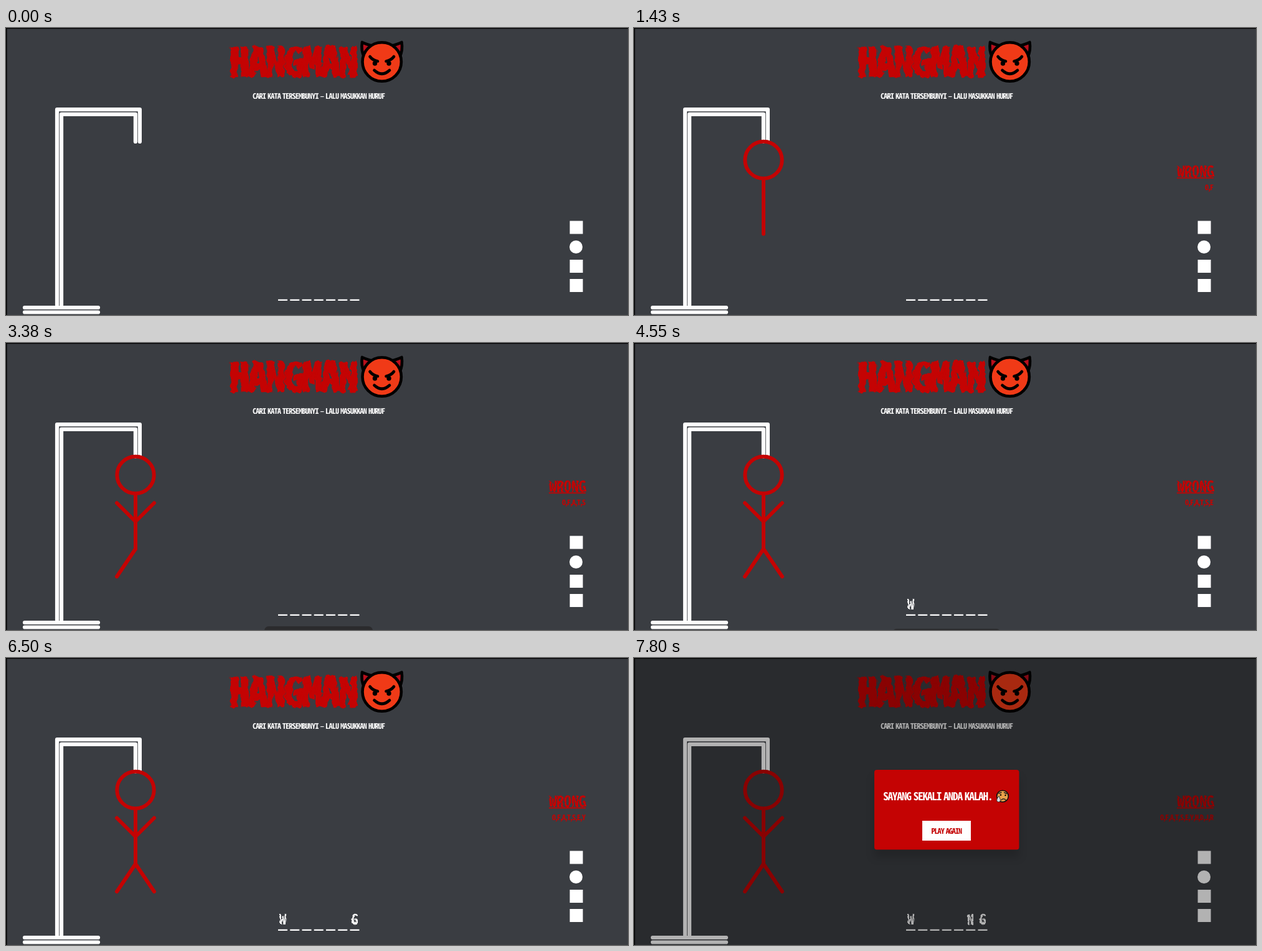
Animation of 999x462 px, one loop 8000 ms. Source, as an HTML page:

```html
<!DOCTYPE html>
<html lang="id">
<head>
<meta charset="utf-8">
<title>Hangman</title>
<style>
  html, body { margin: 0; width: 100%; height: 100%; overflow: hidden; background: #3a3d42; }
  svg { display: block; width: 999px; height: 462px; }
  text {
    font-family: "Noto Sans Mono CJK JP", "Noto Sans Mono CJK SC", "Noto Sans Mono", monospace;
    font-weight: 700;
    font-stretch: extra-condensed;
    text-rendering: geometricPrecision;
    white-space: pre;
  }
  .white { fill: #fff; }
  .red { fill: #c40303; }
  .title { font-size: 64px; letter-spacing: -.044em; stroke: #c40303; stroke-width: 2.4px; }
  .hint { font-size: 12.2px; letter-spacing: -.068em; word-spacing: -.2em; }
  .heading { font-size: 25px; letter-spacing: -.025em; }
  .misses { font-size: 12px; letter-spacing: -2px; text-anchor: end; }
  .guess { font-size: 23px; text-anchor: middle; }
  .message { font-size: 17.5px; letter-spacing: -.075em; word-spacing: -.2em; }
  .button { font-size: 12.2px; letter-spacing: -.085em; word-spacing: -.17em; }
  .line { fill: none; stroke-linecap: round; stroke-linejoin: round; }
  .gallows { stroke: #fff; stroke-width: 6.2px; }
  .figure { stroke: #c40303; stroke-width: 6px; }
  .ink { stroke: #000; stroke-width: 4.6px; }
  .card { filter: drop-shadow(0 12px 7px rgba(0, 0, 0, .16)); }
  [data-at] { visibility: hidden; }
</style>
</head>
<body>
<svg viewBox="0 0 999 462" xmlns="http://www.w3.org/2000/svg">
  <defs>
    <filter id="ragged" color-interpolation-filters="sRGB">
      <feTurbulence type="fractalNoise" baseFrequency=".13 .09" numOctaves="2" seed="8"/>
      <feDisplacementMap in="SourceGraphic" scale="9" xChannelSelector="R" yChannelSelector="G"/>
    </filter>
    <filter id="rough" color-interpolation-filters="sRGB">
      <feTurbulence type="fractalNoise" baseFrequency=".22" numOctaves="2" seed="4"/>
      <feDisplacementMap in="SourceGraphic" scale="4" xChannelSelector="R" yChannelSelector="G"/>
    </filter>
  </defs>
  <rect width="999" height="462" fill="#3a3d42"/>

  <text class="title red" x="359" y="78" data-w="205" filter="url(#ragged)">HANGMAN</text>
  <text class="hint white" x="396" y="113.5" data-w="213">CARI KATA TERSEMBUNYI – LALU MASUKKAN HURUF</text>

  <!-- devil face -->
  <g stroke="#000" stroke-width="4.6" stroke-linejoin="round">
    <path d="M572 23 Q570 36 575 46 L591 29 Q580 27 572 23Z M635.500 23 Q637.500 36 632.500 46 L616.500 29 Q627.500 27 635.500 23Z" fill="#b80f1c"/>
    <circle cx="603.7" cy="54.500" r="31.200" fill="#f03a17"/>
  </g>
  <path class="line ink" d="M584.500 46 Q589 52 597 53.500 M623 46 Q618.500 52 610.500 53.500 M591.500 68 Q603.700 79.500 616 68"/>
  <circle cx="592.500" cy="57" r="3.700"/>
  <circle cx="615" cy="57" r="3.700"/>

  <g class="line gallows">
    <path d="M82 446 V131.200 H214.900 V183"/>
    <path d="M89 446 V138.800 H207.900 V183"/>
    <path d="M30 450 H148 M30 457.500 H148"/>
  </g>

  <g class="line figure">
    <circle cx="208" cy="212.500" r="29.700" data-at="650"/>
    <path d="M208 243 V331.500" data-at="1430"/>
    <path d="M208 287.500 L178 257.500" data-at="1950"/>
    <path d="M208 287.500 L238 257.500" data-at="2730"/>
    <path d="M208 331.500 L178 376" data-at="3380"/>
    <path d="M208 331.500 L238 376" data-at="4550"/>
  </g>

  <g class="red" data-at="650">
    <text class="heading" x="872" y="240" data-w="60" filter="url(#rough)">WRONG</text>
    <rect x="872" y="240.500" width="59" height="1.800"/>
    <text class="misses" id="misses" x="929" y="261"></text>
  </g>

  <g class="white">
    <rect x="905.500" y="310.500" width="21" height="21"/>
    <circle cx="915.500" cy="352.500" r="10.500"/>
    <rect x="905.500" y="373" width="21" height="21"/>
    <rect x="905.500" y="404" width="21" height="21"/>
  </g>

  <path d="M437 437.800 H568" stroke="#fff" stroke-width="2.200" stroke-dasharray="15 4.250"/>
  <g class="white" filter="url(#rough)">
    <text class="guess" x="444.500" y="428.500" data-at="4550">W</text>
    <text class="guess" x="540.500" y="428.500" data-at="7800">N</text>
    <text class="guess" x="560" y="428.500" data-at="6110">G</text>
  </g>

  <rect id="toast" x="415" y="456" width="174" height="40" rx="7" fill="#2b2b2d"/>

  <g data-at="7800">
    <rect width="999" height="462" fill="#000" opacity=".3"/>
    <rect class="card red" x="386" y="180" width="232.500" height="128.500" rx="4"/>
    <text class="message white" x="400" y="228.500" data-w="178">SAYANG SEKALI ANDA KALAH.</text>
    <circle cx="592" cy="222.500" r="9.300" fill="#e9a04a" stroke="#111" stroke-width="1.600"/>
    <path class="line" d="M586 218 L590 216.500 M594.500 216.500 L598.500 218.500 M590 228.500 Q593.500 225 597 228.500" stroke="#222" stroke-width="1.500"/>
    <circle cx="589" cy="220.500" r="1.200"/>
    <circle cx="596.500" cy="221" r="1.200"/>
    <path d="M586 222 Q581 229 583.500 231 Q588 233.500 588.500 228Z" fill="#d5dce2" stroke="#222" stroke-width=".8"/>
    <rect class="white" x="463" y="262" width="78" height="32"/>
    <text class="button red" x="477.500" y="282.500" data-w="50">PLAY AGAIN</text>
  </g>

  <path d="M0 0 H999 V1.300 H1.500 V462 H0Z"/>
</svg>
<script>
  const LOOP = 8000;
  const LETTERS = [..."OFATSEYHDJR"];
  const MISS_TIMES = [650, 1430, 1950, 2730, 3380, 4550, 5720, 7020, 7410, 7670, 7800];
  // [start, top edge]; 470 is below the stage
  const TOAST = [[0, 470], [2730, 460], [2860, 456], [4550, 460], [4680, 470], [6630, 456], [7800, 470]];

  const timed = [...document.querySelectorAll("[data-at]")];
  const misses = document.getElementById("misses");
  const toast = document.getElementById("toast");

  // Use a smaller size where a wider fallback font is in use.
  for (const el of document.querySelectorAll("[data-w]")) {
    const ratio = el.dataset.w / el.getComputedTextLength();
    if (ratio < 1) el.style.fontSize = parseFloat(getComputedStyle(el).fontSize) * ratio + "px";
  }

  function draw(now) {
    const t = now % LOOP;
    for (const el of timed) {
      el.style.visibility = t >= +el.dataset.at ? "visible" : "hidden";
    }
    const count = MISS_TIMES.filter(at => t >= at).length;
    const list = LETTERS.slice(0, count).join(",");
    if (misses.textContent !== list) misses.textContent = list;
    toast.setAttribute("y", TOAST.findLast(([at]) => t >= at)[1]);
  }

  const start = performance.now();
  function tick() {
    draw(performance.now() - start);
    requestAnimationFrame(tick);
  }
  tick();
</script>
</body>
</html>
```
